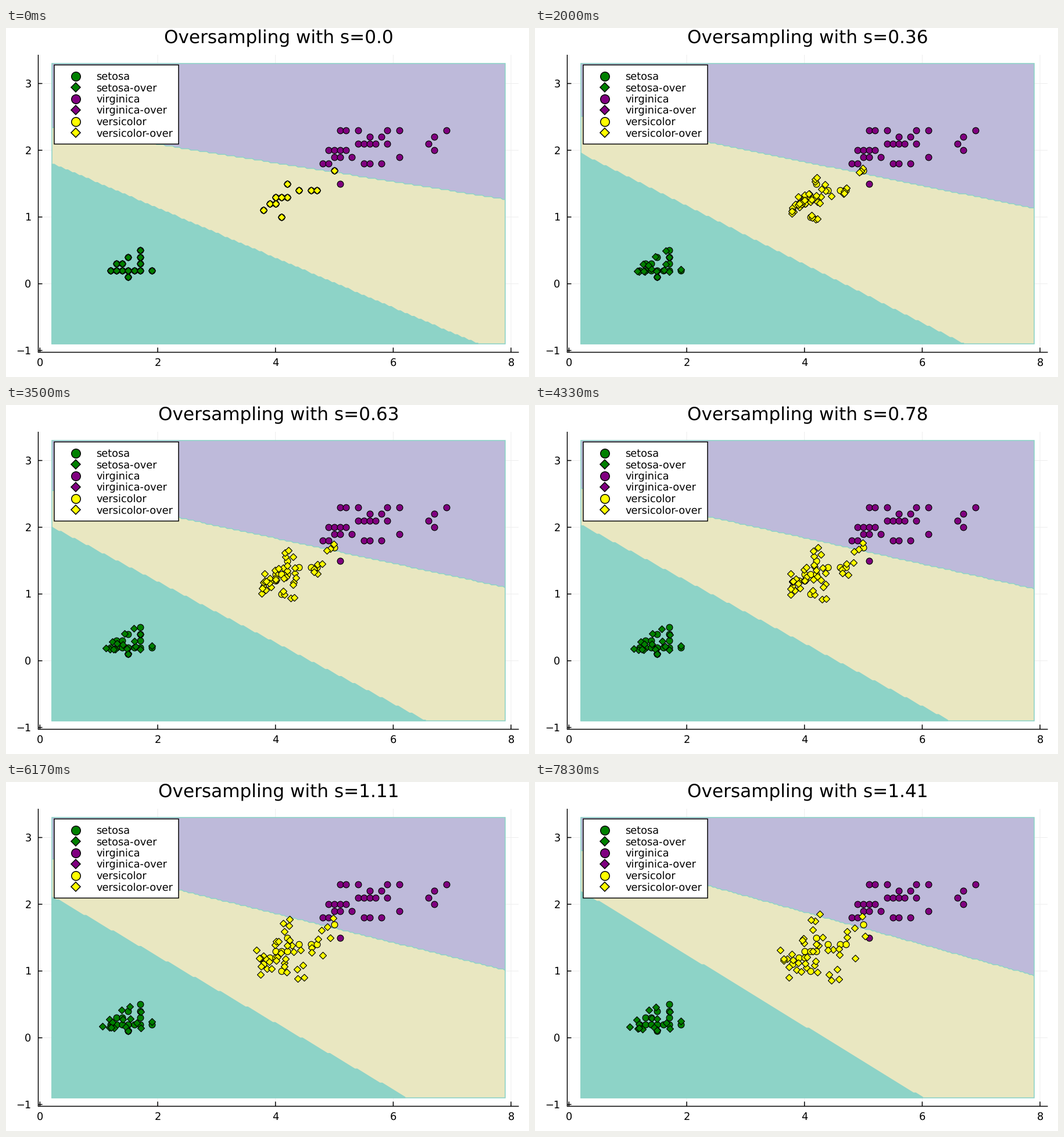
These frames come from a looping animation (900x600 px, 8 s). A matplotlib script:

```python
import numpy as np
import matplotlib.pyplot as plt
from matplotlib.animation import FuncAnimation
from matplotlib.patches import Rectangle

W, H, DPI = 900, 600, 100
FRAMES, INTERVAL = 48, 166  # whole milliseconds, about 8 s per loop
STEP = 0.03
PT = 72 / DPI
LEFT, RIGHT, TOP, BOTTOM = 79, 859, 61, 543
CELLS = 200

TEAL, BEIGE, LILAC = "#8dd3c7", "#e9e7c1", "#bebada"

plt.rcParams.update({"font.family": "DejaVu Sans", "path.snap": False,
                     "text.hinting": "none"})


def to_px(pts):
    """Data coordinates to pixels, y pointing down."""
    return np.array([58.4, 439.7]) + np.asarray(pts) * [101.33, -114.75]


def samples(rows):
    """Rows of {height: [positions]}, both in tenths."""
    return np.array([(x, y) for y, xs in rows.items() for x in xs]) / 10


SETOSA = samples({1: [15], 2: [*range(12, 18), 19], 3: [13, 14, 17],
                  4: [15, 17], 5: [17]})
VIRGINICA = samples({15: [51], 18: [48, 49, 55, 56, 58],
                     19: [50, 51, 53, 61], 20: [*range(49, 53), 67],
                     21: [*range(54, 58), 59, 66], 22: [56, 58, 67],
                     23: [51, 52, 54, 59, 61, 69]})
VERSICOLOR = samples({10: [41], 11: [38], 12: [39, 40], 13: [40, 41, 42],
                      14: [44, 46, 47], 15: [42], 17: [50]})

rng = np.random.default_rng(7)


def oversample(parents, count, spread):
    """Children start on their parents and drift in proportion to s."""
    start = np.resize(parents, (count, 2))
    drift = np.clip(rng.normal(size=(count, 2)), -2, 2) * spread
    return start, drift


fig = plt.figure(figsize=(W / DPI, H / DPI), dpi=DPI, facecolor="white")
ax = fig.add_axes([0, 0, 1, 1])
ax.set_xlim(0, W)
ax.set_ylim(H, 0)
ax.axis("off")


def line(xs, ys, color="black", width=1.5, z=1):
    return ax.plot(xs, ys, color=color, lw=width * PT, zorder=z,
                   solid_capstyle="butt", solid_joinstyle="miter")[0]


def label(x, y, text, size=17.8, ha="left", z=12):
    return ax.text(x, y, text, fontsize=size * PT, ha=ha, va="baseline",
                   zorder=z)


def dots(pts, color, marker, size, z, edge=1.2):
    return ax.plot(*np.transpose(pts), ls="none", marker=marker, ms=size * PT,
                   mfc=color, mec="black", mew=edge * PT, zorder=z)[0]


def box(x, y, w, h, fill, edge, width, z):
    ax.add_patch(Rectangle((x, y), w, h, fc=fill, ec=edge, lw=width * PT,
                           zorder=z))


# Grid, axes and tick labels
for v in range(0, 9, 2):
    x = to_px((v, 0))[0]
    line([x, x], [46, 557], "#ededed", 1, 0)
    line([x, x], [557, 549.5], z=4)
    label(x, 581, str(v), ha="center")
for v in range(-1, 4):
    y = to_px((0, v))[1]
    line([55, 882], [y, y], "#ededed", 1, 0)
    line([55, 62.5], [y, y], z=4)
    label(43.5, y + 6.5, str(v).replace("-", "\u2212"), ha="right")
line([55.5, 55.5], [46, 558], z=4)
line([55, 882.5], [557.5, 557.5], z=4)

# Class regions
box(LEFT, TOP, RIGHT - LEFT, BOTTOM - TOP, LILAC, "none", 0, 1)
beige = ax.fill([0], [0], fc=BEIGE, ec="none", zorder=2)[0]
teal = ax.fill([0], [0], fc=TEAL, ec=TEAL, lw=1.5 * PT, zorder=2.2)[0]
seam = line([], [], TEAL, 1.5, 2.1)
box(LEFT, TOP, RIGHT - LEFT, BOTTOM - TOP, "none", TEAL, 1.6, 3)

# Samples and their synthetic children
dots(to_px(SETOSA), "green", "o", 10.8, 5)
dots(to_px(VIRGINICA), "purple", "o", 10.8, 7)
dots(to_px(VERSICOLOR), "yellow", "o", 10.8, 8)
MOVERS = [
    (dots([(0, 0)], "green", "D", 8, 6),
     *oversample(SETOSA, 17, (0.08, 0.05))),
    (dots([(0, 0)], "yellow", "D", 8, 9),
     *oversample(VERSICOLOR, 42, (0.24, 0.125))),
]

# Legend
box(83, 63.5, 214, 136, "white", "black", 1.5, 10)
row = 83
for name, color in (("setosa", "green"), ("virginica", "purple"),
                    ("versicolor", "yellow")):
    for suffix, marker, size in (("", "o", 15.5), ("-over", "D", 12)):
        dots([(119.5, row)], color, marker, size, 11, 1.5)
        label(155.5, row + 6.2, name + suffix)
        row += 19.45

title = label(469, 27, "", 31.1, "center")

COLS = np.linspace(LEFT, RIGHT, CELLS)
CELL_H = (BOTTOM - TOP) / (CELLS - 1)


def stepped(left, slope):
    """Straight border snapped to the classification grid."""
    y = left + slope * (COLS - LEFT)
    y = TOP + (np.floor((y - TOP) / CELL_H) + 0.5) * CELL_H
    return np.minimum(y, BOTTOM)


def borders(s):
    """Both class borders: a quick first turn, then a slow quadratic one."""
    turn = max(0, 1 - s / 0.12)
    low_left = 222 - 14 * s - 7.5 * s**2 + 11 * turn
    low_floor = 756 - 46 * s - 12 * s**2 + 56 * turn
    high_left = 154.5 - 18.5 * s**2 + 16.5 * turn
    high_right = 308.5 + 12 * s**2 - 14 * turn
    low = stepped(low_left, (BOTTOM - low_left) / (low_floor - LEFT))
    high = stepped(high_left, (high_right - high_left) / (RIGHT - LEFT))
    return low, high


def draw(i):
    s = i * STEP
    title.set_text(f"Oversampling with s={round(s, 2)}")

    low, high = borders(s)
    floor = [(RIGHT, BOTTOM), (LEFT, BOTTOM)]
    beige.set_xy(np.vstack([np.column_stack([COLS, high]), floor]))
    on = low < BOTTOM
    edge = np.column_stack([COLS[on], low[on]])
    teal.set_xy(np.vstack([edge, (COLS[on][-1], BOTTOM), floor[1]]))
    seam.set_data(COLS, high)

    for art, start, drift in MOVERS:
        art.set_data(*to_px(start + s * drift).T)
    return [title, beige, teal, seam] + [m[0] for m in MOVERS]


anim = FuncAnimation(fig, draw, frames=FRAMES, init_func=lambda: draw(0),
                     interval=INTERVAL, repeat=True, repeat_delay=0,
                     blit=False)
plt.show()
```
